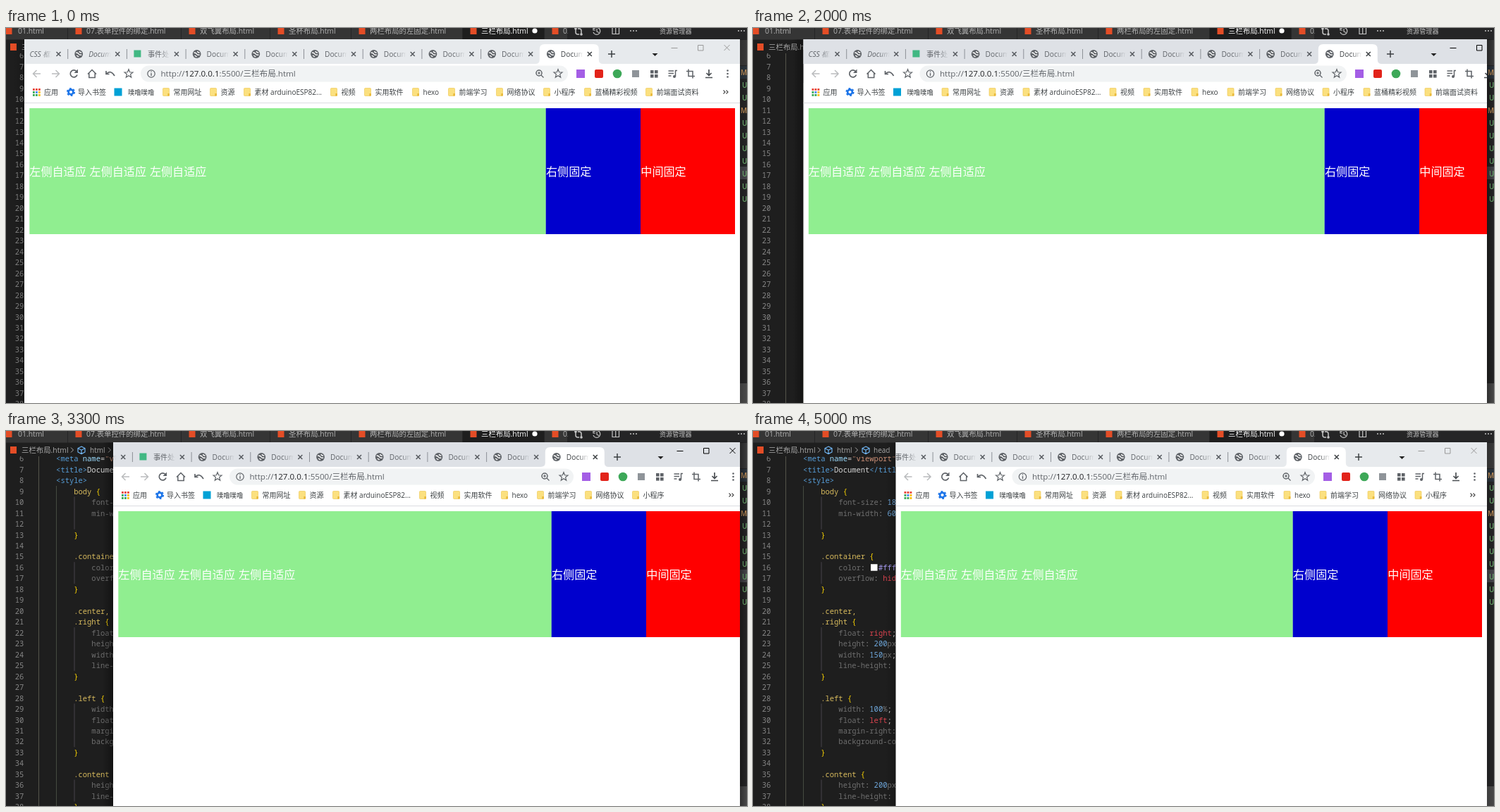
Write an HTML page that moves like this. It is 1051x533 px and loops after 5100 ms.

```html
<!DOCTYPE html>
<html lang="zh">
<head>
<meta charset="utf-8">
<title>三栏布局</title>
<style>
html, body { margin: 0; width: 100%; height: 100%; overflow: hidden; background: #1e1e1e; }
svg { display: block; width: 1051px; height: 533px; }
text { font-family: "Open Sans", "Noto Sans CJK SC", "Noto Sans CJK", sans-serif; white-space: pre; }
.code { font: 10.47px "Noto Sans Mono", "DejaVu Sans Mono", monospace; }
.ln { fill: none; stroke-width: 1.5; }
</style>
</head>
<body>
<svg id="stage" viewBox="0 0 1051 533" xmlns="http://www.w3.org/2000/svg"></svg>
<script>
const LOOP = 5100;

// [start ms, window left, lag of the right side, visible right edge, active]
const STEPS = [
  [0, 26, 0, 1041, 0],
  [1700, 26, 0, 1041, 1],
  [1800, 35, 9, 1041, 1],
  [1900, 53, 27, 1041, 1],
  [2000, 71.5, 45, 1041, 1],
  [2100, 87, 15, 1041, 1],
  [2200, 93, 6, 1041, 1],
  [2300, 95.5, 0, 1041, 1],
  [2900, 104, 8, 1041, 1],
  [3000, 114, 17, 1020, 1],
  [3100, 129, 14, 1041, 1],
  [3200, 143, 12, 1041, 1],
  [3300, 152, 8, 1041, 1],
  [3400, 156, 2, 1041, 1],
  [3800, 182, 14, 1041, 1],
  [3900, 202.5, 0, 1041, 1],
  [5000, 202.5, 0, 1041, 0]
];

const esc = s => s.replace(/&/g, '&amp;').replace(/</g, '&lt;');
const rect = (x, y, w, h, fill, more = '') =>
  `<rect x="${x}" y="${y}" width="${w}" height="${h}" fill="${fill}" ${more}/>`;
const text = (x, y, s, size, fill, more = '') =>
  `<text x="${x}" y="${y}" font-size="${size}" fill="${fill}" ${more}>${esc(s)}</text>`;
const line = (d, color, more = '') => `<path class="ln" d="${d}" stroke="${color}" ${more}/>`;
const dot = (x, y, r, fill) => `<circle cx="${x}" cy="${y}" r="${r}" fill="${fill}"/>`;
const at = (x, y, s) => `<g transform="translate(${x} ${y})">${s}</g>`;

// ---------- editor ----------
const rowY = n => 55 + 15.47 * (n - 7);

const CODE = {
  9: 'body {', 10: 'font-size: 18px;', 11: 'min-width: 600px;', 13: '}',
  15: '.container {', 16: 'color:   #fff;', 17: 'overflow: hidden;', 18: '}',
  20: '.center,', 21: '.right {', 22: 'float: right;', 23: 'height: 200px;',
  24: 'width: 150px;', 25: 'line-height: 200px;', 26: '}',
  28: '.left {', 29: 'width: 100%;', 30: 'float: left;', 31: 'margin-right: 0;',
  32: 'background-color: red;', 33: '}',
  35: '.content {', 36: 'height: 200px;', 37: 'line-height: 200px;', 38: '}'
};

const span = (s, color) => `<tspan fill="${color}">${esc(s)}</tspan>`;
const row = (n, col, body) => `<text class="code" x="${46 + 6.28 * col}" y="${rowY(n) + 3.7}">${body}</text>`;

function paint(s) {
  const cut = s.indexOf(': ');
  if (cut < 0) return s.replace(/[{}]|[^{}]+/g, m => span(m, /[{}]/.test(m) ? '#ffd700' : '#d7ba5d'));
  const value = s.slice(cut + 1).match(/\s+|#\w+|\d+|px|%|[a-z]+|;/g).map(m =>
    span(m, m[0] === '#' ? '#a79bf0' : /\d/.test(m) ? '#6fa8dc' : /px|%/.test(m) ? '#777' : m === ';' ? '#ccc' : '#d8434e'));
  return span(s.slice(0, cut), '#6e6e6e') + span(':', '#999') + value.join('');
}

function editor() {
  let s = rect(0, 0, 1051, 533, '#1e1e1e');
  for (let n = 6; n <= 38; n++)
    s += `<text class="code" x="25.3" y="${rowY(n) + 3.7}" text-anchor="end" fill="#858585">${n}</text>`;
  s += rect(46, 36, 1, 497, '#55554a') + rect(71, rowY(9) - 8, 1, 480, '#454a41');
  for (const [a, b] of [[10, 12], [16, 17], [22, 25], [29, 32], [36, 37]])
    s += rect(96.5, rowY(a) - 8, 1, (b - a + 1) * 15.47, '#47424a');
  const tag = '#569cd6';
  s += row(6, 4, span('<meta ', tag) + span('name', '#9cdcfe') + span('=', '#ccc') + span('"viewport"', '#ce9178'));
  s += row(7, 4, span('<title>', tag) + span('Document', '#d4d4d4') + span('</title>', tag));
  s += row(8, 4, span('<style>', tag));
  for (const n in CODE) s += row(+n, CODE[n].includes(': ') ? 12 : 8, paint(CODE[n]));
  s += rect(167, rowY(16) - 5, 9.5, 9.5, '#fff');

  // breadcrumbs
  const crumb = '#a9a9a9';
  const cube = x => line(`M${x} 22l5 2.6v5.4l-5 2.6l-5-2.6v-5.4zM${x - 5} 24.6l5 2.6l5-2.6M${x} 27.2v5.4`, '#75beff', 'style="stroke-width:1.1"');
  const arrow = x => line(`M${x - 2} 23.5l3.5 3.5l-3.5 3.5`, crumb, 'style="stroke-width:1"');
  s += rect(0, 17, 1041, 19, '#1e1e1e') + rect(6, 22, 9, 10, '#e44d26');
  s += text(22, 31, '三栏布局.html', 10.4, crumb) + arrow(94) + cube(107) + text(119, 31, 'html', 10, crumb);
  s += arrow(147) + cube(160) + text(171, 31, 'head', 10, crumb);

  // file tabs
  s += rect(0, 0, 1051, 16.5, '#252526');
  const tabs = [[-11, 88, '01.html'], [88, 249, '07.表单控件的绑定.html'], [249, 375, '双飞翼布局.html'],
    [375, 490, '圣杯布局.html'], [490, 648, '两栏布局的左固定.html'], [648, 764, '三栏布局.html'], [764, 797, '03']];
  tabs.forEach(([a, b, name], i) => {
    const on = i === 5;
    s += rect(a, 0, b - a - 1, 16.5, on ? '#1e1e1e' : '#353535') + rect(a + 10.5, 0, 9, 9, '#e44d26');
    s += text(i ? a + 26 : 17, 8, name, 10.4, on ? '#fff' : '#b4b4b4', i === 6 ? 'clip-path="url(#tabEnd)"' : '');
  });
  s += dot(750, 4, 3.6, '#fff');
  const ic = '#c5c5c5';
  s += line('M808 1v5a3 3 0 0 0 3 3h2M816 9v-5a3 3 0 0 0-3-3h-2', ic) + dot(808, 1, 1.8, ic) + dot(816, 9, 1.8, ic);
  s += line('M834 1a5 5 0 1 1-1 5M838 1v4l3 1.5M833 0v3h3', ic, 'style="stroke-width:1.2"');
  s += line('M860 -2h9.5v10.5h-9.5zM864.7-2v10.5', ic, 'style="stroke-width:1.2"');
  for (const x of [886, 890, 894, 1039, 1043, 1047]) s += dot(x, 4, 1, ic);
  s += text(927, 8, '资源管理器', 9.1, '#c0c0c0');

  // explorer edge
  s += rect(1041, 16, 10, 517, '#252526') + rect(1041, 17, 10, 36, '#3a3a3a') + rect(1041, 54, 10, 18, '#2b343c');
  s += rect(1041, 197, 10, 18, '#45454a') + rect(1041, 505, 10, 28, '#4a4a4a');
  for (let i = 0; i < 11; i++) {
    const m = i === 0 || i === 3;
    s += text(m ? 1042 : 1044, 67 + 17.95 * i, m ? 'M' : 'U', 9.8, m ? '#c8955c' : '#6faf70', 'font-weight="600"');
  }
  return s;
}

// ---------- browser ----------
const GREY = '#5f6368';
const star = (x, y) => {
  let p = '';
  for (let i = 0; i < 10; i++) {
    const r = i % 2 ? 2.7 : 6.3, a = Math.PI * (i / 5 - .5);
    p += (i ? 'L' : 'M') + (x + r * Math.cos(a)).toFixed(1) + ' ' + (y + r * Math.sin(a)).toFixed(1);
  }
  return line(p + 'z', GREY, 'style="stroke-width:1.2"');
};
const globe = (x, y) => dot(x, y, 5.9, GREY) +
  line(`M${x - 4} ${y - 2}q3 0 4 2t4 1M${x + 1} ${y - 4}q0 2 3 2M${x - 3} ${y + 2}l3 2`, '#fff', 'style="stroke-width:1.4"');
const cross = (x, y, r, c, w = 1.5) => line(`M${x - r} ${y - r}l${2 * r} ${2 * r}m0 ${-2 * r}l${-2 * r} ${2 * r}`, c, `style="stroke-width:${w}"`);

function browserTab(i) {
  const on = i === 9, title = i === 0 ? 'CSS 框架' : i === 2 ? '事件处理' : 'Docume';
  let s = '';
  if (on) s += '<path d="M-6 51q6 0 6-6v-15q0-7 7-7h70q7 0 7 7v15q0 6 6 6z" fill="#fff"/>';
  else if (i) s += rect(0, 30, 1, 14, '#8d9197');
  s += i === 2 ? rect(10.5, 31.5, 10, 10, '#41b883') : globe(16, 37);
  s += text(30, 40.8, title, 10.2, `url(#fade${on ? 1 : 0})`, i < 2 ? 'font-style="italic"' : '');
  s += cross(71, 37, 3, on ? '#3c4043' : '#55595e');
  return at(3.5 + 83.7 * i, 0, s);
}

function rightSide() {
  let s = '';
  for (let i = 0; i < 10; i++) s += browserTab(i);
  s += line('M854 37h10M859 32v10', '#3c4043') + '<path d="M916.5 36h8l-4 4z" fill="#222"/>';
  s += '<g id="buttons" class="ln" style="stroke-width:1"><path d="M943.500 28.500h9M981.500 24.500h7.500v7.500h-7.500zM1018.500 24l8 8m0-8l-8 8"/></g>';
  return s;
}

function rightTools() {
  let s = `<circle class="ln" cx="756" cy="64" r="4" stroke="${GREY}"/>` + line('M759 67l3.500 3.500M754 64h4M756 62v4', GREY, 'style="stroke-width:1.2"');
  s += star(783, 65) + rect(809, 59, 12, 12, '#a45ee5') + rect(835, 59, 12, 12, '#e2231a', 'rx="2"');
  s += dot(867, 65, 6.3, '#3da858') + rect(888, 60, 10, 10, '#8f9499');
  for (const [x, y] of [[914, 60], [920, 60], [914, 66], [920, 66]]) s += rect(x, y, 4.6, 4.6, GREY);
  s += line('M939.500 61h7.500M939.500 64.500h7.500M939.500 68h4M949.500 69v-8.500h2.500', GREY) + dot(948, 69, 2, GREY);
  s += line('M968 58.500v10h9M965 61.500h9v10', GREY);
  s += line('M997 59v8M993.500 64l3.500 3.500l3.500-3.500M992 70.500h10', '#4a4e52', 'style="stroke-width:1.7"');
  for (const y of [60.5, 65, 69.5]) s += dot(1023.5, y, 1.3, GREY);
  s += line('M1017.500 88.500l2.500 2.500l-2.500 2.500M1021.500 88.500l2.500 2.500l-2.500 2.500', '#444', 'style="stroke-width:1.1"');
  return s;
}

const MARKS = [[201, '常用网址'], [268, '资源'], [316, '素材 arduinoESP82...'], [439, '视频'], [487, '实用软件'], [555, 'hexo'],
  [606, '前端学习'], [674, '网络协议'], [741, '小程序'], [799, '蓝桶精彩视频'], [886, '前端面试资料']];
const markEnd = ([x, name]) => x + 10 + name.length * 10;

function leftTools() {
  const light = '#babcbe';
  let s = line('M23 65h-10M17.500 60l-5 5l5 5', light) + line('M39 65h10M44.500 60l5 5l-5 5', light);
  s += line('M74.300 62a5 5 0 1 0 .7 4.500', GREY, 'style="stroke-width:1.7"') + `<path d="M76 58.500v5.500h-5.500z" fill="${GREY}"/>`;
  s += line('M90 65.500l6-6l6 6M91.800 64v6.500h8.400v-6.500', GREY);
  s += line('M116 61v4.500h4.500M116.500 65q6-6 11.500 3', GREY, 'style="stroke-width:1.7"') + star(148, 65);
  s += `<circle class="ln" cx="180" cy="65" r="5.200" stroke="${GREY}" style="stroke-width:1.2"/>` + line('M180 64v4M180 61.500v1.300', GREY, 'style="stroke-width:1.3"');
  s += `<text x="193.500" y="69.300" font-size="11.6">${span('http://', GREY)}${span('127.0.0.1', '#202124')}${span(':5500/三栏布局.html', GREY)}</text>`;
  const hues = ['#ea4335', '#ea4335', '#ea4335', '#34a853', '#4285f4', '#fbbc04', '#34a853', '#34a853', '#fbbc04'];
  hues.forEach((c, i) => s += rect(12 + i % 3 * 4, 86 + Math.floor(i / 3) * 4, 2.8, 2.8, c));
  const ink = '#3c4043';
  s += text(28, 94.8, '应用', 10, ink);
  s += '<circle cx="66" cy="91" r="3.400" fill="none" stroke="#1a73e8" stroke-width="2.600"/>' +
    '<circle cx="66" cy="91" r="5.200" fill="none" stroke="#1a73e8" stroke-width="1.800" stroke-dasharray="2.720"/>';
  s += text(76, 94.8, '导入书签', 10, ink) + rect(127.5, 85.5, 11, 11, '#00a1d6') + text(147, 94.8, '噗噜噗噜', 9.3, ink);
  MARKS.forEach(([x, name], i) => {
    s += `<g id="mark${i}">` + rect(x - 4.5, 85.5, 9, 11, '#fbe07f', 'rx="1" stroke="#ecc44c" stroke-width=".6"') +
      rect(x + 2.3, 93, 2.6, 3.5, '#e9b93a') + text(x + 10.5, 94.8, name, 10, ink) + '</g>';
  });
  return s;
}

const label = (x, s) => text(x, 210, s, 16.1, '#fff');
const fade = (id, c) => `<linearGradient id="${id}" gradientUnits="userSpaceOnUse" x1="46" x2="62" y1="0" y2="0">
  <stop stop-color="${c}"/><stop offset="1" stop-color="${c}" stop-opacity="0"/></linearGradient>`;
const shade = (id, a, b) => `<linearGradient id="${id}"><stop stop-opacity="${a}"/><stop offset="1" stop-opacity="${b}"/></linearGradient>`;

const stage = document.getElementById('stage');
stage.innerHTML = `<defs>${fade('fade0', '#5f6368')}${fade('fade1', '#3c4043')}${shade('dimL', 0, .6)}${shade('dimR', .6, 0)}
  <clipPath id="win"><rect id="clip" y="16" height="517"/></clipPath>
  <clipPath id="tabEnd"><rect x="764" y="0" width="33" height="17"/></clipPath></defs>` +
  editor() +
  '<g id="shadow">' + rect(0, 16, 15, 517, 'url(#dimL)', 'id="shadeL"') + rect(1041, 16, 10, 517, 'url(#dimR)') + '</g>' +
  '<g id="gap">' + rect(1020, 16, 14, 517, '#0d0d0d') + rect(1034, 16, 7, 517, '#1c1c1c') + '</g>' +
  '<g clip-path="url(#win)">' + rect(0, 16, 1051, 517, '#fff') + rect(0, 16, 1051, 35, '#e7eaed', 'id="strip"') +
  `<g id="right">${rightSide()}</g>` + rect(0, 53.5, 10, 23, '#f1f3f4', 'id="pill" rx="11.5"') +
  `<g id="tools">${rightTools()}</g><g id="left">${leftTools()}</g>` +
  rect(0, 106, 1051, 1, '#dadce0') + rect(0, 114, 10, 179, '#90ee90', 'id="green"') +
  '<g id="boxes">' + rect(765.7, 114, 134.3, 179, '#0000cd') + rect(900, 114, 134, 179, '#f00') +
  label(766, '右侧固定') + label(900.3, '中间固定') + '</g>' +
  '<g id="words">' + [0, 1, 2].map(i => label(7.3 + 85.3 * i, '左侧自适应')).join('') + '</g></g>';

const el = id => document.getElementById(id);
const set = (id, attrs) => { for (const k in attrs) el(id).setAttribute(k, attrs[k]); };

function draw(ms) {
  const [, left, lag, edge, active] = STEPS.filter(s => s[0] <= ms).pop();
  set('clip', { x: left, width: edge - left });
  for (const id of ['right', 'tools', 'boxes']) set(id, { transform: `translate(${lag} 0)` });
  for (const id of ['left', 'words']) set(id, { transform: `translate(${left} 0)` });
  set('pill', { x: left + 165, width: 632 + lag - left });
  set('green', { x: left + 7.3, width: 758.5 + lag - left });
  set('strip', { fill: active ? '#dee1e6' : '#e7eaed' });
  set('buttons', { stroke: active ? '#000' : '#999' });
  set('shadow', { opacity: active ? .6 : .3 });
  set('shadeL', { x: left - 15 });
  set('gap', { visibility: edge < 1041 ? 'visible' : 'hidden' });
  MARKS.forEach((m, i) => {
    const end = i === 2 ? 422 : markEnd(m);
    set('mark' + i, { visibility: left + end < 1000 + lag ? 'visible' : 'hidden' });
  });
}

const begin = performance.now();
function tick() {
  draw((performance.now() - begin) % LOOP);
  requestAnimationFrame(tick);
}
draw(0);
requestAnimationFrame(tick);
</script>
</body>
</html>
```
